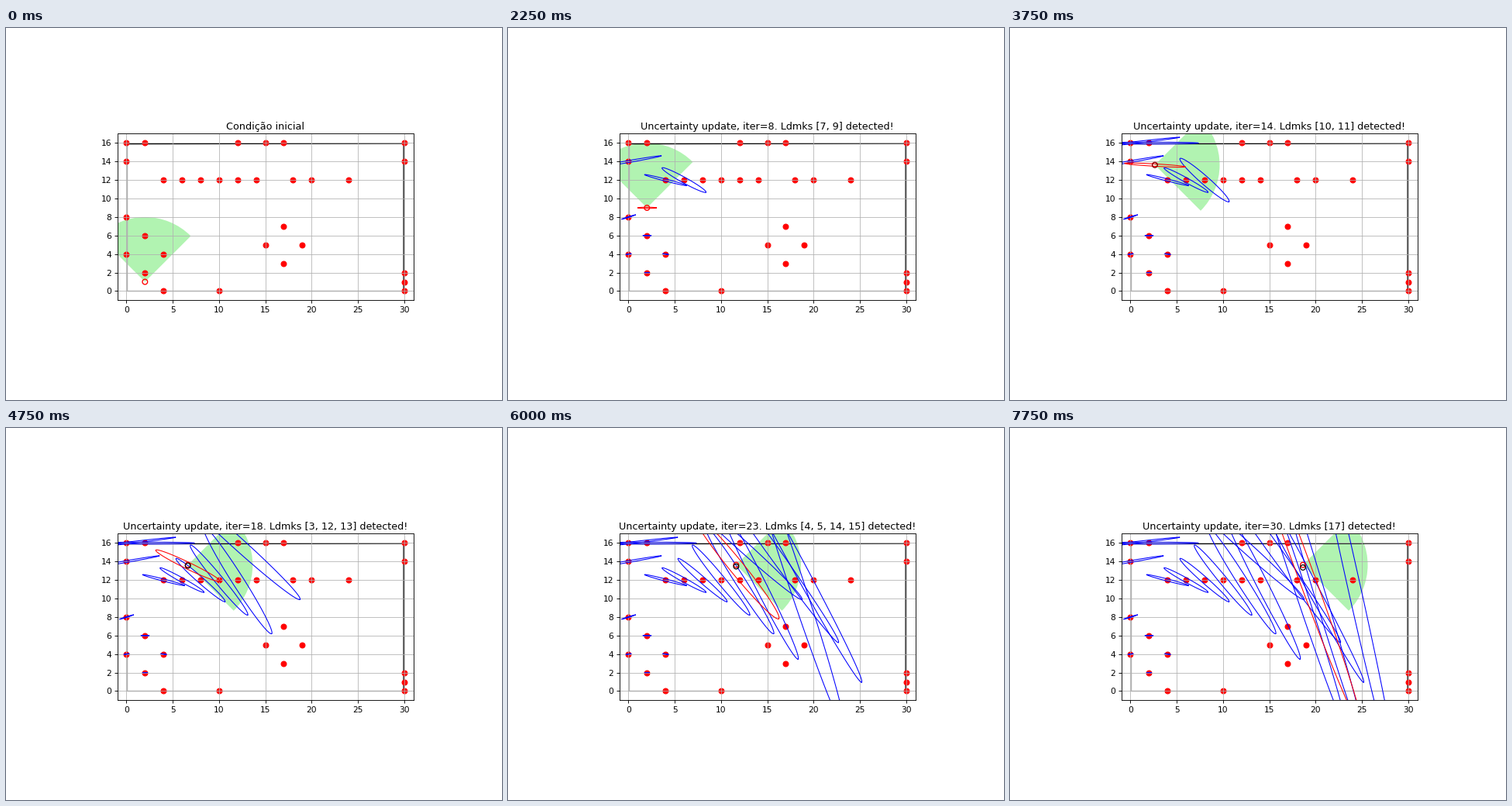
Animation, 640 px wide and 480 px high, one loop 8000 ms. Source, as a matplotlib script:

```python
import numpy as np
import matplotlib.pyplot as plt
from matplotlib.animation import FuncAnimation
from matplotlib.patches import Wedge

W, H, DPI = 640, 480, 80
STEPS, INTERVAL = 32, 250
REACH, HALF_FOV = 7, 45
START = (2, 1)

# Landmarks by row; they are numbered from 1 in this order.
ROWS = [
    (16, [0, 2, 12, 15, 17, 30]), (14, [0, 30]),
    (12, [*range(4, 15, 2), 18, 20, 24]), (8, [0]), (7, [17]),
    (6, [2]), (5, [15, 19]), (4, [0, 4]), (3, [17]), (2, [2, 30]),
    (1, [30]), (0, [4, 10, 30]),
]
LANDMARKS = [(x, y) for y, xs in ROWS for x in xs]


def pose(it):
    """Up the left side, a quarter turn in two steps, then right."""
    x0, y0 = START
    turn = np.clip(it - 12, 0, 2) * np.pi / 4
    r = 2 / np.pi
    x = x0 + r * (1 - np.cos(turn)) + max(it - 14, 0)
    y = y0 + min(it, 12) + r * np.sin(turn)
    return x, y, 90 - np.degrees(turn)


def detect(it):
    x, y, heading = pose(it)
    seen = []
    for n, (lx, ly) in enumerate(LANDMARKS, 1):
        bearing = np.degrees(np.arctan2(ly - y, lx - x)) - heading
        near = np.hypot(lx - x, ly - y) < REACH - 1e-6
        if near and abs(bearing) < HALF_FOV - 1e-6:
            seen.append(n)
    return seen


def spread(x, y):
    """Half-axes of the uncertainty, growing with the way from the start."""
    x, y = x - START[0], y - START[1]
    growth = min((y / 11) ** 2, 1.05)
    swing = min(0.28 + 0.003 * x * x, 1)
    dx = 0.25 + 0.0015 * y ** 3 + 3.2 * np.sin(np.pi * x / 36) ** 3
    dy = -growth * swing * x
    minor = growth * np.clip(0.05 * x, 0.08, 0.55)
    return dx, dy, minor


def ellipse(x, y, count=1, drift=0):
    """Uncertainty outline at a point; repeated sightings make it narrower."""
    dx, dy, minor = spread(x, y)
    minor *= 1 + 0.5 / count
    size = np.hypot(dx, dy)
    t = np.linspace(0, 2 * np.pi, 120)
    return (x + dx * np.cos(t) - minor * dy / size * np.sin(t),
            y - drift + dy * np.cos(t) + minor * dx / size * np.sin(t))


DETECTED = [detect(it) for it in range(STEPS - 1)]

plt.rcParams["font.family"] = "DejaVu Sans"
fig = plt.figure(figsize=(W / DPI, H / DPI), dpi=DPI, facecolor="white")
ax = fig.add_axes([143.5 / W, 128.6 / H, 382.1 / W, 214.9 / H])
ax.set_xlim(-1, 31)
ax.set_ylim(-1, 17)
ax.set_xticks(range(0, 31, 5))
ax.set_yticks(range(0, 17, 2))
ax.tick_params(labelsize=9.6, length=3.2)
ax.grid(True, lw=0.7)
title = ax.set_title("", fontsize=11.5, pad=5.4)

sector = Wedge(START, REACH, 45, 135, facecolor="lightgreen",
               edgecolor="none", alpha=0.7, zorder=0.8)
ax.add_patch(sector)
ax.plot([0.08, 0.08, 30], [16, 0.04, 0.04], color="#b0b0b0", lw=1.3, zorder=0.9)
ax.plot([0, 29.95, 29.95], [15.9, 15.95, 0], color="black", lw=1.1, zorder=0.9)
ax.scatter(*zip(*LANDMARKS), s=38, color="red", zorder=1)

blobs = {n: ax.plot([], [], color="blue", lw=0.95, zorder=2)[0]
         for n in sorted(set(sum(DETECTED, [])))}
robot_blob, = ax.plot([], [], color="red", lw=0.95, zorder=2.5)
robot = ax.scatter(*START, s=36, facecolors="none", edgecolors="red",
                   linewidths=1.2, zorder=3)
guess = ax.scatter(*START, s=36, facecolors="none", edgecolors="black",
                   linewidths=1.1, zorder=4)


def draw(frame):
    it = frame - 1
    x, y, heading = pose(max(it, 0))
    drift = 0.0165 * max(it - 13, 0)

    if it < 0:
        title.set_text("Condição inicial")
        robot_blob.set_data([], [])
    else:
        title.set_text(f"Uncertainty update, iter={it}. "
                       f"Ldmks {DETECTED[it]} detected!")
        robot_blob.set_data(*ellipse(x, y, drift=drift))

    for n, line in blobs.items():
        count = sum(n in seen for seen in DETECTED[:it + 1])
        line.set_data(*(ellipse(*LANDMARKS[n - 1], count) if count else ([], [])))

    sector.set_center((x, y))
    sector.set_theta1(heading - HALF_FOV)
    sector.set_theta2(heading + HALF_FOV)
    robot.set_offsets([(x, y)])
    guess.set_offsets([(x, y - drift)])
    guess.set_alpha(float(np.clip((it - 12) / 4, 0, 1)))
    return []


anim = FuncAnimation(fig, draw, frames=STEPS, interval=INTERVAL,
                     repeat=True, repeat_delay=0, blit=False)
plt.show()
```
